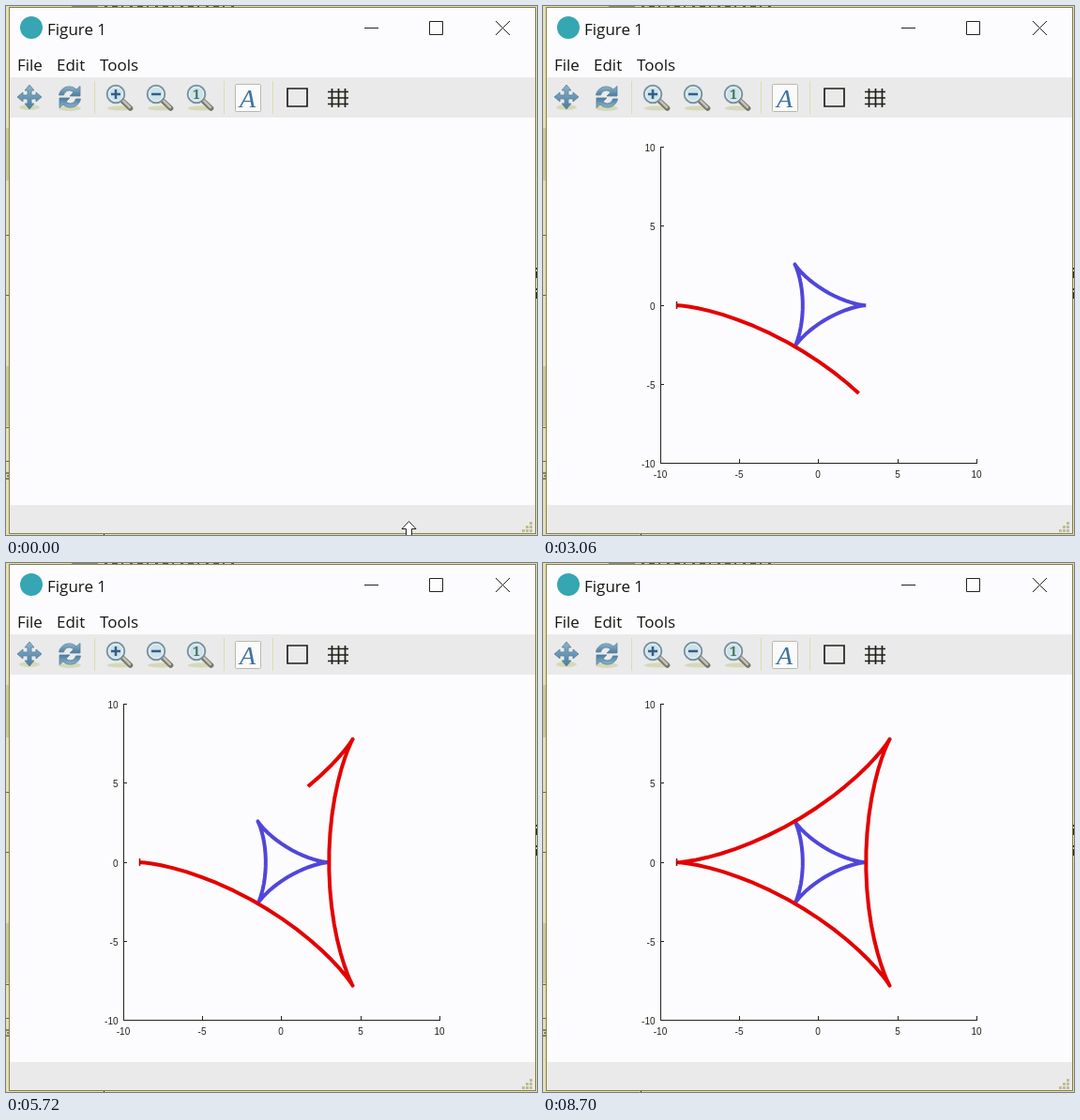
An HTML page for the animation above (8720 ms loop, 566 px wide and 564 px high).

```html
<!DOCTYPE html>
<html lang="en">
<head>
<meta charset="utf-8">
<title>Figure 1</title>
<style>
  html, body { margin: 0; width: 100%; height: 100%; overflow: hidden; background: #fcfcfe; }
  svg { display: block; width: 566px; height: 564px; }
  .ui { font: 17px "Open Sans", "Noto Sans", sans-serif; fill: #141410; }
  .labels { font: 10px "Liberation Sans", Arial, sans-serif; fill: #24241c; }
  .thin { fill: none; stroke: #24241c; }
  .sep { stroke: #dedcae; }
  .curve { fill: none; stroke-width: 4; stroke-linejoin: round; }
</style>
</head>
<body>
<svg viewBox="0 0 566 564">
  <defs>
    <linearGradient id="steel" x1="0" y1="0" x2="0" y2="1">
      <stop offset="0" stop-color="#8db4cc"/>
      <stop offset="1" stop-color="#497c9f"/>
    </linearGradient>
    <g id="lens">
      <ellipse cx="5" cy="15" rx="14" ry="2.5" fill="#d5d9b8"/>
      <path d="M7 7L15.500 15" stroke="#77776c" stroke-width="5.500" stroke-linecap="round"/>
      <path d="M8 7L15 14" stroke="#c3c2b4" stroke-width="2.500" stroke-linecap="round"/>
      <circle r="9.300" fill="#cfe2ea" stroke="#7894a0" stroke-width="2"/>
      <circle r="7.700" fill="none" stroke="#eef5f6"/>
    </g>
    <path id="turn" d="M-11.500 -2C-10 -11 1 -14 7 -8L11 -11.500V-1H0L4 -5C0 -8.500 -5 -7 -6.500 -2Z"
          fill="url(#steel)" stroke="#56829a" stroke-width=".8"/>
  </defs>

  <!-- desktop edge behind the window -->
  <rect width="566" height="564" fill="#e3dfb4"/>
  <path d="M70 0h28v1h-28z" fill="#8e8c80"/>
  <path d="M105 .5h140" stroke="#5d5a3c" stroke-dasharray="3 5 6 4 2 7"/>
  <path d="M0 244.500h3M0 308.500h3M0 449.500h3M0 485.500h3" stroke="#6d6936"/>
  <path d="M0 130h3v56h-3zM0 384h3v64h-3z" fill="#cdc795"/>
  <path d="M0 498h3M1 501h2M0 504h3M565.500 279v2M565.500 283v7M565.500 301v2M565.500 305v7M104.500 563v1" stroke="#24241c"/>

  <!-- window -->
  <rect x="3.500" y="1.500" width="561" height="561" fill="#fcfcfe" stroke="#858044"/>
  <path d="M4 76h560v43H4zM4 532h560v30H4z" fill="#eaeaeb"/>
  <circle cx="27" cy="23" r="12" fill="#35a6b2"/>
  <g class="ui">
    <text x="44" y="31">Figure 1</text>
    <text x="12" y="69">File</text>
    <text x="54" y="69">Edit</text>
    <text x="100" y="69">Tools</text>
  </g>
  <path class="thin" d="M382 23.500h15M451.500 16.500h14v14h-14zM522 16l15 15M537 16l-15 15"/>
  <path class="sep" d="M94.500 80v35M232.500 80v35M284.500 80v35"/>

  <!-- toolbar -->
  <ellipse cx="25" cy="108" rx="11" ry="3" fill="#d5d9b8"/>
  <path transform="translate(25 97)" fill="url(#steel)" stroke="#56829a" stroke-width=".8"
        d="M0 -13L5 -7H2V-2H7V-5L13 0L7 5V2H2V7H5L0 13L-5 7H-2V2H-7V5L-13 0L-7 -5V-2H-2V-7H-5Z"/>
  <ellipse cx="68" cy="109" rx="12" ry="3" fill="#d5d9b8"/>
  <g transform="translate(68 97)">
    <use href="#turn"/>
    <use href="#turn" transform="rotate(180)"/>
  </g>
  <use href="#lens" x="117" y="94"/>
  <use href="#lens" x="160" y="94"/>
  <use href="#lens" x="203" y="94"/>
  <path d="M112 94h10M117 89v10M155 94h10" stroke="#315f86" stroke-width="2.500"/>
  <text x="203" y="99" text-anchor="middle" font-family="Noto Serif, serif" font-size="14" font-weight="700" fill="#3f7358">1</text>
  <rect x="244.500" y="83.500" width="27" height="29" rx="1" fill="#fafafa" stroke="#b9b9aa"/>
  <text x="257.500" y="108" text-anchor="middle" font-family="Liberation Serif, serif" font-size="28" font-style="italic" fill="#3f739d">A</text>
  <path d="M300 88h21v19h-21z" fill="none" stroke="#202018" stroke-width="1.700"/>
  <path d="M347.500 88v20M354.500 88v20M361.500 88v20M343 91.500h22M343 98h22M343 104.500h22" stroke="#202018" stroke-width="1.700"/>
  <path d="M558 550h3v3h-3zM558 554h3v3h-3zM554 554h3v3h-3zM558 558h3v3h-3zM554 558h3v3h-3zM550 558h3v3h-3z" fill="#bfbd94"/>

  <path id="cursor" d="M429.500 549.500L437 557.500H432.500V566H426.500V557.500H422Z" fill="#fff" stroke="#24241c"/>

  <g id="plot" visibility="hidden">
    <path id="axes" class="thin"/>
    <g id="labels" class="labels"></g>
    <polyline id="inner" class="curve" stroke="#5146da"/>
    <polyline id="outer" class="curve" stroke="#e40000"/>
    <path id="start" d="M142.500 315v8" stroke="#8e1208" stroke-width="1.500"/>
  </g>
</svg>
<script>
  const LOOP = 8720, UNIT = 16.86, CX = 293.7, CY = 319.2, STEP = 0.1, LAST = 63;
  const PLOT_TICK = 36, CURSOR_TICK = 6;
  const el = id => document.getElementById(id);
  const show = (id, on) => el(id).setAttribute("visibility", on ? "visible" : "hidden");

  function deltoid(scale, steps) {
    const points = [];
    for (let i = 0; i <= steps; i++) {
      const a = i * STEP;
      const x = CX + UNIT * scale * (2 * Math.cos(a) + Math.cos(2 * a));
      const y = CY - UNIT * scale * (2 * Math.sin(a) - Math.sin(2 * a));
      points.push(x.toFixed(2) + "," + y.toFixed(2));
    }
    return points.join(" ");
  }

  function addLabel(text, x, y, anchor) {
    const node = document.createElementNS("http://www.w3.org/2000/svg", "text");
    node.setAttribute("x", x);
    node.setAttribute("y", y);
    node.setAttribute("text-anchor", anchor);
    node.textContent = text;
    el("labels").append(node);
  }

  function buildAxes() {
    let d = "M125.5 150V487.5H463";
    for (let v = -10; v <= 10; v += 5) {
      const x = Math.floor(CX + v * UNIT) + 0.5;
      const y = Math.floor(CY - v * UNIT) + 0.5;
      d += `M${x} 488v-5M125 ${y}h4`;
      addLabel(v, x - 0.5, 503, "middle");
      addLabel(v, 119.5, y + 4, "end");
    }
    el("axes").setAttribute("d", d);
  }

  function tickAt(time) {
    const rest = time % 140;
    return 3 * Math.floor(time / 140) + (rest < 20 ? 0 : rest < 120 ? 1 : 2);
  }

  const begin = performance.now();
  function draw() {
    const tick = tickAt((performance.now() - begin) % LOOP);
    const steps = Math.min(LAST, Math.floor(2.5 + 0.59 * (tick - 43)));
    show("cursor", tick < CURSOR_TICK);
    show("plot", tick >= PLOT_TICK);
    show("start", steps > 0);
    el("outer").setAttribute("points", steps > 0 ? deltoid(-3, steps) : "");
    requestAnimationFrame(draw);
  }

  buildAxes();
  el("inner").setAttribute("points", deltoid(1, LAST));
  draw();
</script>
</body>
</html>
```
